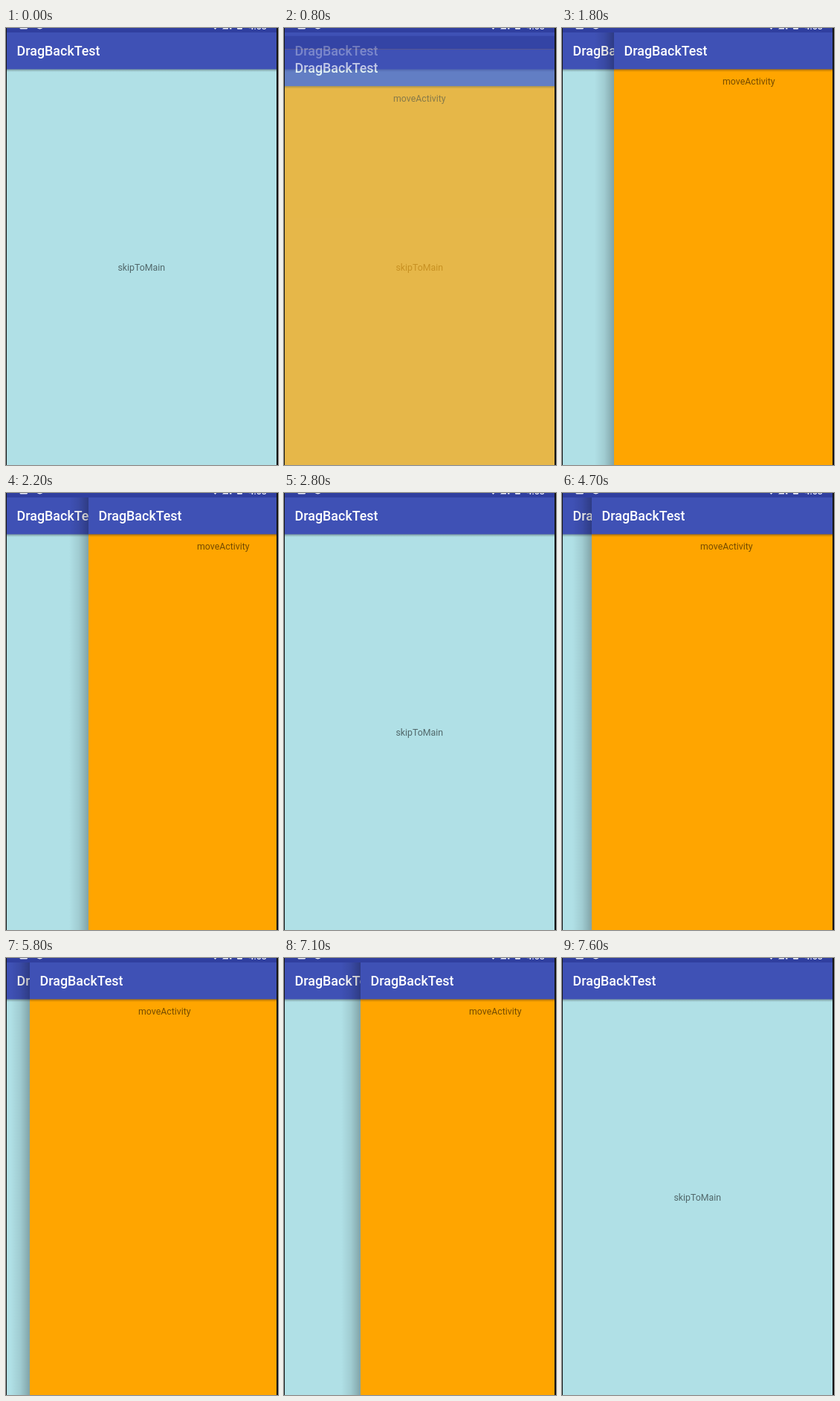
Recreate the animation shown at these times as an HTML page. Size 366 by 587 pixels, loop 8000 ms.

```html
<!DOCTYPE html>
<html lang="en">
<head>
<meta charset="utf-8">
<title>Drag back</title>
<style>
  html, body { margin: 0; width: 100%; height: 100%; overflow: hidden; background: #151515; }
  svg { display: block; }
  text { font-family: Roboto, sans-serif; }
  .title { font-size: 17.87px; font-weight: 500; fill: #fff; }
  .label { font-size: 12.35px; fill: #000; fill-opacity: .54; text-anchor: middle; }
</style>
</head>
<body>
<svg width="366" height="587" viewBox="0 0 366 587">
  <defs>
    <clipPath id="screen"><rect x="1" width="363" height="587"/></clipPath>
    <linearGradient id="edge">
      <stop offset="0" stop-opacity="0"/>
      <stop offset=".5" stop-opacity=".09"/>
      <stop offset="1" stop-opacity=".27"/>
    </linearGradient>
    <linearGradient id="drop" x2="0" y2="1">
      <stop offset="0" stop-opacity=".34"/>
      <stop offset="1" stop-opacity="0"/>
    </linearGradient>
    <g id="bar">
      <rect x="1" y="55" width="363" height="4" fill="url(#drop)"/>
      <rect x="1" y="-12" width="363" height="18" fill="#303f9f"/>
      <rect x="1" y="6" width="363" height="49.4" fill="#3f51b5"/>
      <text class="title" x="14.6" y="37.4">DragBackTest</text>
    </g>
  </defs>
  <g clip-path="url(#screen)">
    <rect x="1" width="363" height="587" fill="#b0e0e6"/>
    <use href="#bar"/>
    <text class="label" x="182.3" y="326">skipToMain</text>

    <g id="sheet">
      <rect x="-25" y="6" width="26" height="581" fill="url(#edge)"/>
      <rect x="1" width="363" height="640" fill="#ffa500"/>
      <use href="#bar"/>
      <text class="label" x="182.3" y="76">moveActivity</text>
    </g>

    <rect x="1" width="363" height="6" fill="#303f9f"/>
    <g fill="#fff" fill-opacity=".9">
      <rect x="18.5" y="-8" width="10.5" height="9.5" rx="1.5"/>
      <circle cx="45.5" cy="-4.2" r="5.7"/>
      <path d="M275-5h13L281.5 2zM291 1.5l8-8v8zM301 0h2.5v1.5h-2.5z"/>
      <rect x="311" y="-9" width="7" height="10.8" rx="1"/>
      <text x="326.5" y="1.5" font-size="12.35" font-weight="500">4:58</text>
    </g>
  </g>
</svg>
<script>
const LOOP = 8000, STEP = 100, WIDTH = 363, FLICK = 4.4;
const sheet = document.getElementById('sheet');

const openings = [750, 3650];
const move = (start, duration, to, power = 3) => ({ start, duration, to, power });
const moves = [
  move(750, 1, 0),
  move(1700, 500, 110, FLICK),
  move(2500, 300, WIDTH),
  move(3650, 1, 0),
  move(4400, 300, 39),
  move(4800, 400, 0),
  move(5700, 200, 33, FLICK),
  move(6000, 400, 0),
  move(6800, 300, 102),
  move(7200, 400, WIDTH)
];

// share of a motion still to go, easing out
const rest = (age, duration, power) =>
  (1 - Math.min(1, Math.max(0, age / duration))) ** power;

const offsetAt = t => moves.reduce((x, m) =>
  m.to + (x - m.to) * rest(t - m.start, m.duration, m.power), WIDTH);

function draw(now) {
  const t = Math.floor(now % LOOP / STEP) * STEP;
  const x = Math.round(offsetAt(t));
  const age = t - (openings.filter(o => o < t).pop() || 0);
  sheet.setAttribute('transform', `translate(${x} ${49 * rest(age, 350, 5)})`);
  sheet.setAttribute('opacity', 1 - rest(age, 200, 4));
  sheet.setAttribute('visibility', x < WIDTH ? 'visible' : 'hidden');
}

function tick() {
  draw(performance.now());
  requestAnimationFrame(tick);
}
tick();
</script>
</body>
</html>
```
